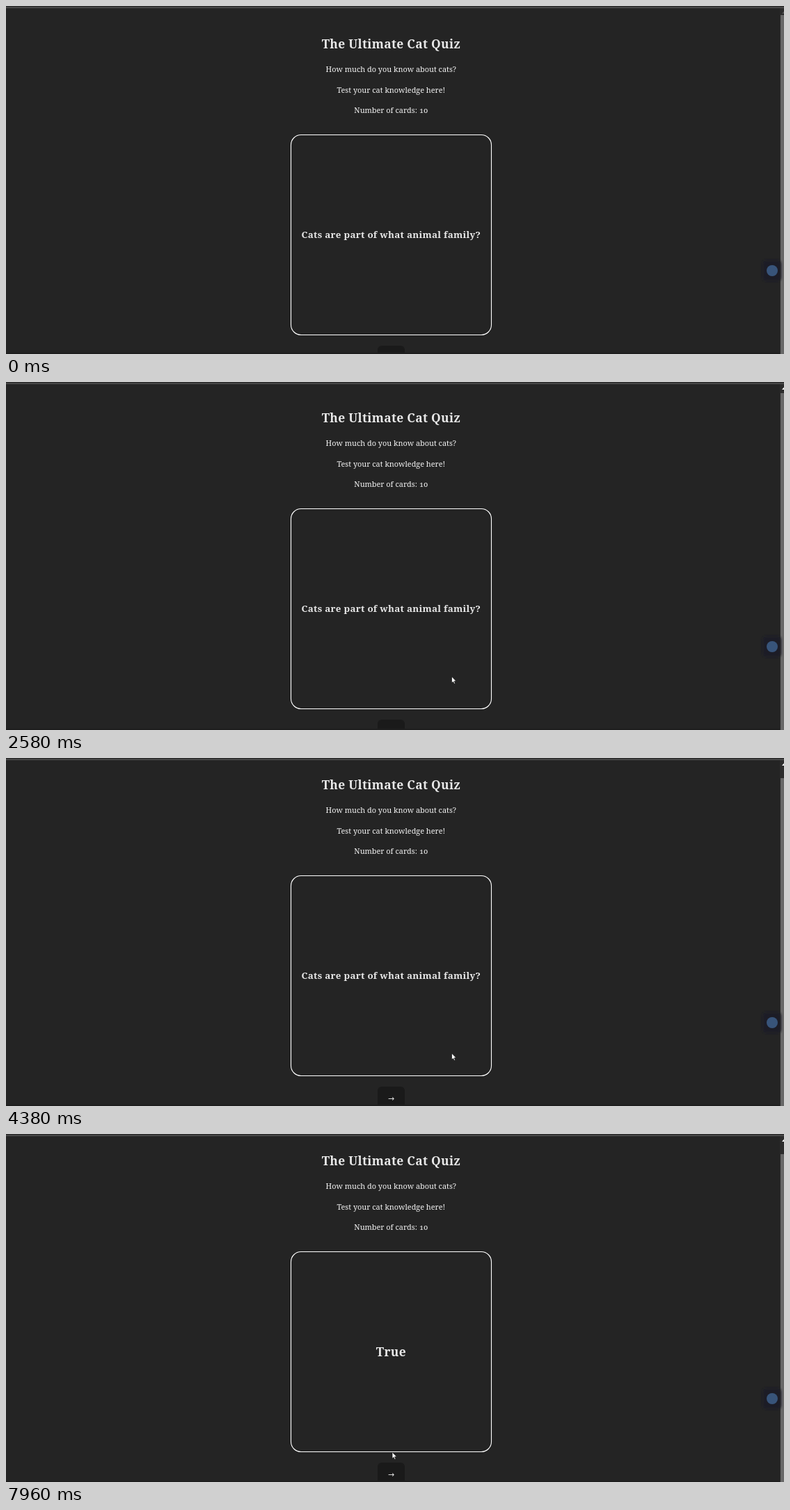
Write an HTML page that moves like this. It is 1118 by 501 pixels and loops after 8 s.

```html
<!DOCTYPE html>
<html lang="en">
<head>
<meta charset="utf-8">
<title>Cat Quiz</title>
<style>
  html, body { margin: 0; width: 100%; height: 100%; overflow: hidden; background: #242424; }
  svg { display: block; width: 1118px; height: 501px; }
  text { fill: #f4f4f4; text-anchor: middle; font: 10.9px Georgia, "Noto Serif", serif; font-variant-numeric: oldstyle-nums; }
  .title, .card { fill: #e8e8e8; font-weight: 700; }
  .title, .big { font-size: 17.4px; letter-spacing: .3px; }
  .card { font-size: 13.4px; letter-spacing: .27px; }
  .card.big { font-size: 17.4px; }
  .arrow { fill: #e4e4e4; font: 11px "DejaVu Sans", sans-serif; }
</style>
</head>
<body>
<svg viewBox="0 0 1118 501">
  <defs>
    <filter id="soft" x="-30%" y="-30%" width="160%" height="160%"><feGaussianBlur stdDeviation="1.6"/></filter>
  </defs>
  <rect width="1118" height="501" fill="#242424"/>
  <g id="page">
    <text class="title" x="553.3" y="60.5">The Ultimate Cat Quiz</text>
    <text x="553.3" y="95">How much do you know about cats?</text>
    <text x="553.3" y="124.5">Test your cat knowledge here!</text>
    <text x="553.3" y="154">Number of cards: 10</text>
    <rect x="409.5" y="185.5" width="288" height="288" rx="14.5" fill="none" stroke="#fff" stroke-width="1.1"/>
    <text id="label" class="card" x="553.3"></text>
    <rect x="534" y="489" width="39" height="33" rx="6" fill="#1a1a1a"/>
    <rect id="ring" x="534.3" y="489.5" width="38.4" height="32" rx="5.5" fill="none" stroke="#fff" stroke-width="1.2"/>
    <text class="arrow" x="553.4" y="509.5">→</text>
  </g>
  <rect y="499" width="1112" height="2" fill="#1e1e1e"/>
  <rect width="1118" height="2" fill="#303030"/>
  <rect y="2" width="1118" height="1" fill="#5a5a5a"/>
  <rect x="1112" y="3" width="6" height="498" fill="#2c2c2c"/>
  <rect id="thumb" x="1113" width="5" height="501" fill="#686868"/>
  <path id="up" d="M1115 11l3-3.4v3.4z"/>
  <rect x="1087" y="366" width="27" height="30" rx="5" fill="#1c1f26" filter="url(#soft)"/>
  <circle cx="1101" cy="381" r="8" fill="#38547a"/>
  <g id="cursor" stroke="#111" stroke-width=".7" stroke-linejoin="round" fill="#fff">
    <path id="pointer" d="M0 0V9.3L2.1 7.4L3.5 10.6L5 9.9L3.6 6.8H6.5Z"/>
    <path id="hand" d="M-1.2 1Q0-1 1.2 1V5L5.8 6Q7 6.4 6.8 8L6 11V13.3H-.8V11.6L-4 7.6Q-3.6 6-2.2 7L-1.2 8Z"/>
  </g>
</svg>
<script>
const LOOP = 8000, TICK = 67;
const $ = id => document.getElementById(id);
const clamp = v => Math.max(0, Math.min(1, v));
const ease = v => v * v * (3 - 2 * v);
const mix = (a, b, k) => a + (b - a) * k;
const snap = t => Math.floor(t / TICK + .05) * TICK;

// Cursor sweeps; sag bends the path downwards.
const sweeps = [
  { at: 840, end: 910, from: [907, 490], to: [863, 456] },
  { at: 1240, end: 1450, from: [854, 468], to: [719, 412] },
  { at: 1780, end: 1980, from: [707, 424], to: [640.5, 424], sag: 11 },
  { at: 4380, end: 5140, from: [640.5, 425], to: [565.5, 483] },
  { at: 6340, end: 6810, from: [566, 478], to: [569, 378] },
  { at: 7090, end: 7160, from: [567, 386], to: [567, 386] },
  { at: 7690, end: 7960, from: [566, 392], to: [555, 458] }
];

function cursorAt(t) {
  const s = sweeps.findLast(s => s.at <= t);
  if (!s) return null;
  const steps = Math.round((s.end - s.at) / TICK);
  const k = clamp(Math.floor((t - s.at) / (s.end - s.at) * steps + .05) / steps);
  const e = ease(k), bend = (s.sag || 0) * 4 * k * (1 - k);
  return [mix(s.from[0], s.to[0], e), mix(s.from[1], s.to[1], e) + bend];
}

const scrollAt = t => t < 2510 ? 0 : Math.round(16 * ease(clamp(.2 + snap(t - 2510) / TICK / 10)));

// Button outline fades in on hover and out on leaving.
const fade = t => ease(clamp(snap(t) / 330));
const glowAt = t => fade(t - 5070) - fade(t - 6410);

function labelAt(t) {
  if (t < 5680) return "Cats are part of what animal family?";
  return t < 7090 ? "Cats only eat meat" : "True";
}

function draw(t) {
  const dy = scrollAt(t), pos = cursorAt(t);
  $("page").setAttribute("transform", `translate(0 ${-dy})`);
  $("thumb").setAttribute("y", 13 + dy);
  $("up").setAttribute("fill", dy ? "#f4f4f4" : "#555");
  $("ring").setAttribute("opacity", glowAt(t));

  const label = $("label"), big = t >= 7090;
  label.textContent = labelAt(t);
  label.classList.toggle("big", big);
  label.setAttribute("y", big ? 336 : 334);

  $("cursor").style.display = pos ? "" : "none";
  if (!pos) return;
  const [x, y] = pos;
  const over = y >= 489 - dy && x > 534 && x < 573;
  $("cursor").setAttribute("transform", `translate(${x} ${y})`);
  $("pointer").style.display = over ? "none" : "";
  $("hand").style.display = over ? "" : "none";
}

const start = performance.now();
function frame() {
  draw((performance.now() - start) % LOOP);
  requestAnimationFrame(frame);
}
draw(0);
requestAnimationFrame(frame);
</script>
</body>
</html>
```
